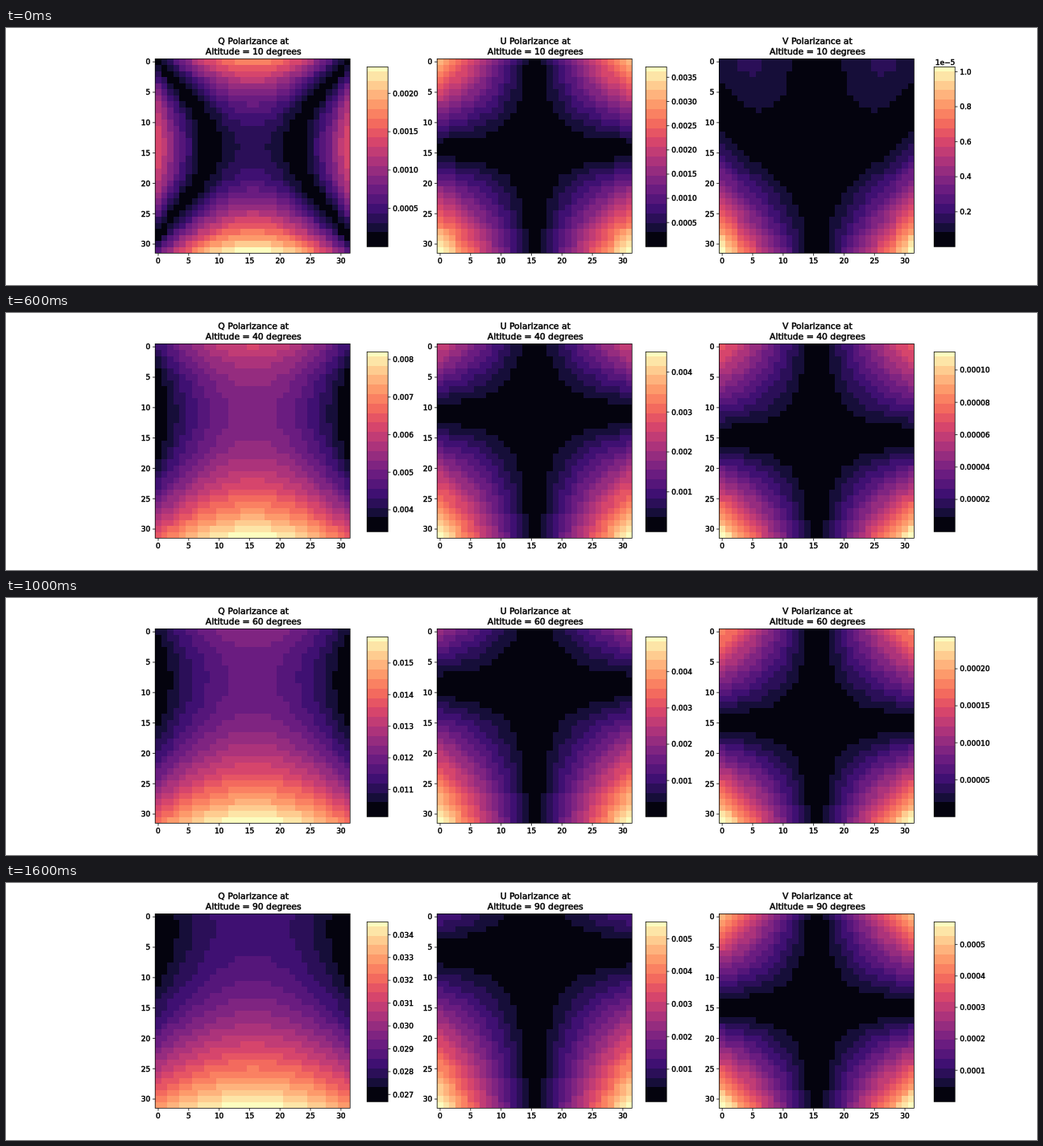
An HTML page with a canvas for the animation above (1.8 s loop, 1280 by 320 pixels).

```html
<!DOCTYPE html>
<html lang="en">
<head>
<meta charset="utf-8">
<title>Polarizance by altitude</title>
<style>
html, body { margin: 0; width: 100%; height: 100%; overflow: hidden; background: #fff; }
canvas { display: block; }
</style>
</head>
<body>
<canvas id="stage" width="1280" height="320"></canvas>
<script>
const ctx = document.getElementById('stage').getContext('2d');
const N = 32, BANDS = 19, SIZE = 242, TOP = 38.4, CELL = SIZE / N;
const BAR_TOP = 48.4, BAR_H = 224;

// Smooth curve through evenly spaced values, for altitude step n = 0..8
function through(n, ...ys) {
  const m = n / 8 * (ys.length - 1);
  return ys.reduce((sum, y, i) =>
    sum + ys.reduce((p, _, j) => j === i ? p : p * (m - j) / (i - j), y), 0);
}

const STOPS = ['000004', '140e36', '3b0f70', '641a80', '8c2981', 'b73779',
  'de4968', 'f7705c', 'fe9f6d', 'fecf92', 'fcfdbf']
  .map(h => [0, 2, 4].map(i => parseInt(h.slice(i, i + 2), 16)));

function magma(t) {
  const p = t * (STOPS.length - 1), k = Math.min(Math.floor(p), STOPS.length - 2);
  return `rgb(${STOPS[k].map((c, j) => Math.round(c + (STOPS[k + 1][j] - c) * (p - k)))})`;
}

// The two darkest bands share one tone
const COLORS = Array.from({ length: BANDS + 1 }, (_, i) => magma(i < 2 ? .02 : i / BANDS));

// Each field gives its colour range and a function of u, v in [-1, 1]
function fieldQ(n) {
  const hi = through(n, 2.345, 5.56, 11.6, 20.98, 34.56) / 1e3;
  const lo = through(n, -1.4, 1.13, 6.4, 14.69, 26.68) / 1e3;
  const mid = through(n, -.094, -.384, -.87);
  const bend = .00175, saddle = lo + bend, rise = (hi - saddle) / (1 - mid) ** 2;
  return { lo: Math.max(0, lo), hi, at: (u, v) => saddle + rise * (v - mid) ** 2 - bend * u * u };
}

function fieldU(n) {
  const hi = through(n, 3.715, 4.74, 5.52) / 1e3;
  const mid = through(n, 14.4, 9.9, 5.9) / 15.5 - 1;
  return { lo: 0, hi, at: (u, v) => hi * u * (v - mid) / (1 - mid) };
}

function fieldV(n) {
  const hi = through(n, 1.0275, 6.55, 16.99, 33.27, 57.2);
  const corner = .84 - .74 * Math.exp(-.43 * n), zero = -.04 - .42 * Math.exp(-1.1 * n);
  const q = (1 + corner) / 2, e = (1 - corner) / 2, s = .2 / hi;
  const r = (e + q * zero) / (1 - zero * zero), p = e - r - s;
  return { lo: 0, hi: hi * 1e-5, at: (u, v) => hi * 1e-5 * u * (p + q * v + r * v * v + s * u * u) };
}

const PANELS = [
  { name: 'Q', x: 185.2, bar: 448.2, field: fieldQ },
  { name: 'U', x: 535.2, bar: 794.2, field: fieldU },
  { name: 'V', x: 885.4, bar: 1152.2, field: fieldV }
];

function text(str, x, y, align, size = 9) {
  ctx.font = `${size}px "DejaVu Sans", sans-serif`;
  ctx.textAlign = align;
  ctx.fillStyle = ctx.strokeStyle = '#000';
  ctx.lineWidth = .5;
  ctx.fillText(str, x, y);
  ctx.strokeText(str, x, y);
}

function line(x, y, dx, dy) {
  ctx.strokeStyle = '#000';
  ctx.lineWidth = .8;
  ctx.beginPath();
  ctx.moveTo(x, y);
  ctx.lineTo(x + dx, y + dy);
  ctx.stroke();
}

function box(x, y, w, h) {
  ctx.strokeStyle = '#000';
  ctx.lineWidth = .75;
  ctx.strokeRect(x, y, w, h);
}

// Fill between whole pixels so that neighbours leave no seam; share is 0 to 1
function fill(x0, y0, x1, y1, share) {
  const [l, t, r, b] = [x0, y0, x1, y1].map(Math.round);
  ctx.fillStyle = COLORS[Math.round(Math.max(0, Math.min(1, share)) * BANDS)];
  ctx.fillRect(l, t, r - l, b - t);
}

function tickStep(range) {
  const raw = range / 9, unit = 10 ** Math.floor(Math.log10(raw));
  return unit * [1, 2, 2.5, 5, 10].find(m => m * unit >= raw);
}

function drawMap(x, { lo, hi, at }) {
  for (let r = 0; r < N; r++) {
    for (let c = 0; c < N; c++) {
      const value = Math.abs(at(c / 15.5 - 1, r / 15.5 - 1));
      fill(x + c * CELL, TOP + r * CELL, x + (c + 1) * CELL, TOP + (r + 1) * CELL,
        (value - lo) / (hi - lo));
    }
  }
  box(x, TOP, SIZE, SIZE);
  for (let k = 0; k <= 30; k += 5) {
    const d = (k + .5) * CELL;
    line(x + d, TOP + SIZE, 0, 3.2);
    text(k, x + d, 293.3, 'center');
    line(x, TOP + d, -3.2, 0);
    text(k, x - 6, TOP + d + 3.3, 'right');
  }
}

function drawBar(x, { lo, hi }) {
  const w = 26, bottom = BAR_TOP + BAR_H;
  for (let y = 0; y < BAR_H; y++) fill(x, bottom - y - 1, x + w, bottom - y, (y + .5) / BAR_H);
  box(x, BAR_TOP, w, BAR_H);

  const step = tickStep(hi - lo), last = Math.floor(hi / step);
  const scale = last * step < 9.9e-5 ? 1e-5 : 1;
  const digits = Math.max(0, -Math.floor(Math.log10(step / scale) + 1e-9));
  for (let k = Math.ceil(lo / step + 1e-6); k <= last; k++) {
    const y = bottom - (k * step - lo) / (hi - lo) * BAR_H;
    line(x + w, y, 3.2, 0);
    text((k * step / scale).toFixed(digits), x + w + 6, y + 3.3, 'left');
  }
  if (scale < 1) text('1e\u22125', x + w, 45.5, 'right');
}

function draw(n) {
  ctx.fillStyle = '#fff';
  ctx.fillRect(0, 0, 1280, 320);
  for (const { name, x, bar, field } of PANELS) {
    const f = field(n), mid = x + SIZE / 2 + 1;
    text(`${name} Polarizance at`, mid, 20.2, 'center', 10.8);
    text(`Altitude = ${(n + 1) * 10} degrees`, mid, 32.9, 'center', 10.8);
    drawMap(x, f);
    drawBar(bar, f);
  }
}

let shown = -1;
const start = performance.now();
function tick() {
  const n = Math.floor((performance.now() - start) % 1800 / 200);
  if (n !== shown) draw(shown = n);
  requestAnimationFrame(tick);
}
tick();
</script>
</body>
</html>
```
